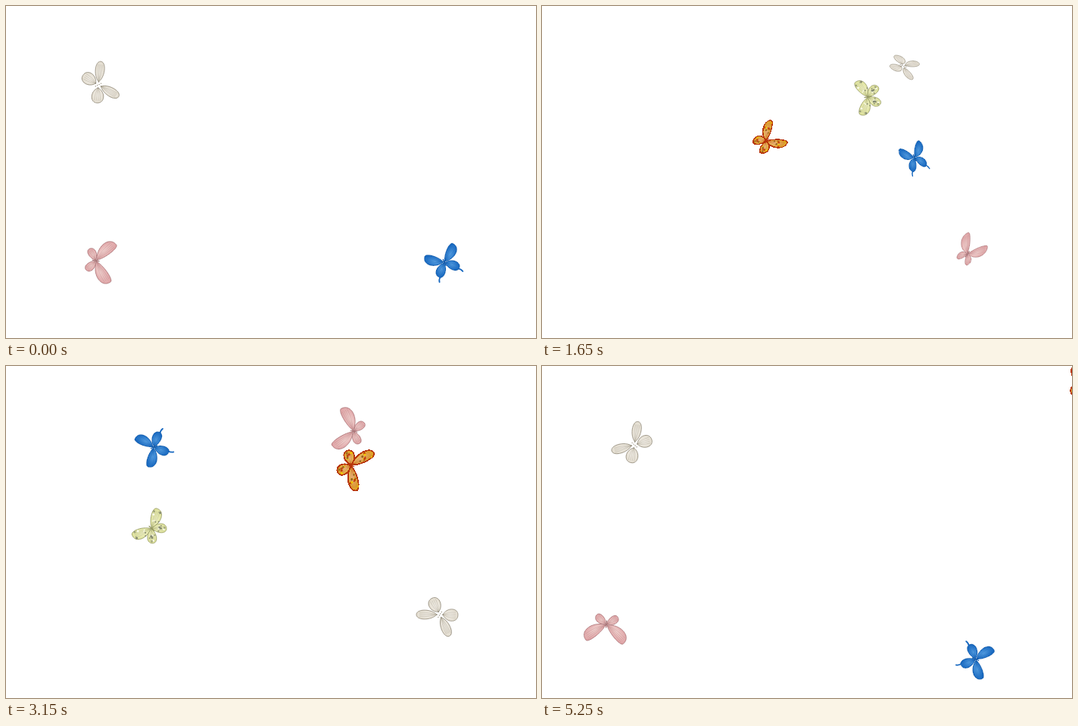
An HTML page for the animation above (5.4 s loop, 700 by 438 pixels).

```html
<!DOCTYPE html>
<html lang="en">
<head>
<meta charset="utf-8">
<title>Butterflies</title>
<style>
  html, body { margin: 0; width: 100%; height: 100%; overflow: hidden; background: #fff; }
  svg { display: block; width: 100vw; height: 100vh; }
  path { fill: none; stroke-linejoin: round; stroke-linecap: round; }
  .wing { shape-rendering: crispEdges; }
</style>
</head>
<body>
<svg id="stage" viewBox="0 0 700 438"></svg>
<script>
const STEP = 150, STEPS = 36, LEG = 7;
const WAYPOINT_STEPS = [0, 4, 11, 14, 21, 26, 35];

// fore, hind: angle from the head, length, fullness of the leading and trailing edge
// flap: depth of the wing beat; beats: wing beats per leg; headings: one per leg
const butterflies = [
  { inner: '#efc68e', outer: '#dc9d1c', edge: '#b8360c', edgeWidth: 1.8, spots: ['#c23a0c', '#f0c800', '#96641c'],
    fore: [53, 34, 6, 11], hind: [128, 20, 9, 9], flap: .16, headings: [-38, -36, 25, -63, -63],
    path: '-35,300 128,227 296,178 355,167 456,131 574,257 718,30' },
  { inner: '#f0f1c6', outer: '#dee29c', edge: '#92965f', spots: ['#9ea27e', '#fafbe8', '#858a70'],
    fore: [62, 27, 6, 12], hind: [140, 20, 9, 7], flap: .216, beats: 2, headings: [-165, 171, -137, -139, -160],
    path: '740,200 617,156 430,120 354,154 192,214 113,161 -35,105' },
  { inner: '#f2d3d0', outer: '#dfa5a7', edge: '#a87275',
    fore: [47, 34, 5, 15], hind: [130, 18, 8, 6], flap: .19, headings: [9, -54, -166, 158, 96],
    path: '119,336 328,353 562,327 597,238 459,86 214,83 85,341' },
  { inner: '#5ba4e6', outer: '#1768c0', edge: '#0f58a8', tail: 27,
    fore: [49, 27, 5, 12], hind: [137, 21, 9, 7], flap: .147, headings: [-115, -114, 155, 80, 23],
    path: '579,338 525,255 492,200 439,115 195,107 113,214 573,387' },
  { inner: '#f3efe8', outer: '#e3ddd0', edge: '#8a8271', gap: 4,
    fore: [57, 31, 8, 8], hind: [122, 24, 11, 10], flap: .279, headings: [-27, 24, 123, 180, -138],
    path: '122,104 264,67 477,79 541,134 573,328 473,381 122,104' },
];

const stage = document.getElementById('stage');
let seed = 7;
const random = () => (seed = seed * 16807 % 2147483647) / 2147483647;

function add(parent, tag, attrs = {}) {
  const node = document.createElementNS('http://www.w3.org/2000/svg', tag);
  for (const key in attrs) node.setAttribute(key, attrs[key]);
  return parent.appendChild(node);
}

// A teardrop along +x, with its leading edge on the -y side
const petal = (base, length, lead, trail) =>
  `M${base} 0C${length * .35} ${-lead} ${length} ${-lead} ${length} 0`
  + `C${length} ${trail} ${length * .35} ${trail} ${base} 0Z`;

function drawWing(parent, b, fill, [angle, length, lead, trail]) {
  const base = b.gap || 1;
  const wing = add(parent, 'g', { transform: `rotate(${angle - 90})` });
  if (b.tail) {
    add(wing, 'path', { d: `M${length - 2} 1Q${length + 3} 0 ${b.tail} 2`, stroke: b.outer, 'stroke-width': 1.8 });
  }
  add(wing, 'path', {
    class: 'wing', d: petal(base, length, lead, trail),
    style: `fill:${fill}`, stroke: b.edge, 'stroke-width': b.edgeWidth || .7,
  });
  for (let i = 1; i < 5; i++) {
    const y = (-lead + (lead + trail) * i / 5) * .6;
    add(wing, 'path', {
      d: `M${base} 0Q${length * .4} ${y} ${length * .86} ${y}`,
      stroke: b.edge, 'stroke-width': .5, opacity: .5,
    });
  }
  for (let i = 0; b.spots && i < 9; i++) {
    add(wing, 'circle', {
      cx: length * (.35 + .55 * random()), cy: (-lead + (lead + trail) * random()) * .6,
      r: .8 + random() * .8, fill: b.spots[i % b.spots.length],
    });
  }
}

butterflies.forEach((b, i) => {
  const id = 'tint' + i;
  const tint = add(stage, 'radialGradient', { id, cx: .45, r: .55 });
  add(tint, 'stop', { 'stop-color': b.inner });
  add(tint, 'stop', { offset: 1, 'stop-color': b.outer });

  b.points = b.path.split(' ').map(point => point.split(',').map(Number));
  b.node = add(stage, 'g');
  b.wings = add(b.node, 'g');
  const half = add(b.wings, 'g', { id: 'half' + i });
  drawWing(half, b, `url(#${id})`, b.hind);
  drawWing(half, { ...b, tail: 0 }, `url(#${id})`, b.fore);
  add(b.wings, 'use', { href: '#half' + i, transform: 'scale(-1 1)' });
  add(b.node, 'path', {
    d: 'M0-4V5', stroke: b.edge, 'stroke-width': 1.2, 'stroke-dasharray': b.gap ? '.1 2.6' : 'none',
  });
});

function slope(points, i, axis) {
  const span = k => WAYPOINT_STEPS[k + 1] - WAYPOINT_STEPS[k];
  const secant = k => (points[k + 1][axis] - points[k][axis]) / span(k);
  if (i === 0) return secant(0);
  if (i === points.length - 1) return secant(i - 1);
  return (span(i) * secant(i - 1) + span(i - 1) * secant(i)) / (span(i - 1) + span(i));
}

// Smooth curve through the unevenly timed waypoints
function position(points, step, axis) {
  let i = 0;
  while (i < points.length - 2 && step > WAYPOINT_STEPS[i + 1]) i++;
  const span = WAYPOINT_STEPS[i + 1] - WAYPOINT_STEPS[i];
  const u = (step - WAYPOINT_STEPS[i]) / span, v = 1 - u;
  return points[i][axis] * (1 + 2 * u) * v * v + points[i + 1][axis] * (1 + 2 * v) * u * u
    + span * u * v * (slope(points, i, axis) * v - slope(points, i + 1, axis) * u);
}

function draw(step) {
  const leg = Math.max(0, Math.ceil(step / LEG) - 1);
  for (const { node, wings, points, headings, flap, beats = 1 } of butterflies) {
    const [x, y] = [0, 1].map(axis => position(points, step, axis));
    const spread = 1 - flap * (1 - Math.cos(2 * Math.PI * beats * step / LEG));
    node.setAttribute('transform', `translate(${x} ${y}) rotate(${headings[leg] + 90})`);
    wings.setAttribute('transform', `scale(${spread} 1)`);
  }
}

const start = performance.now();
function tick() {
  draw(Math.floor((performance.now() - start) / STEP) % STEPS);
  requestAnimationFrame(tick);
}
tick();
</script>
</body>
</html>
```
